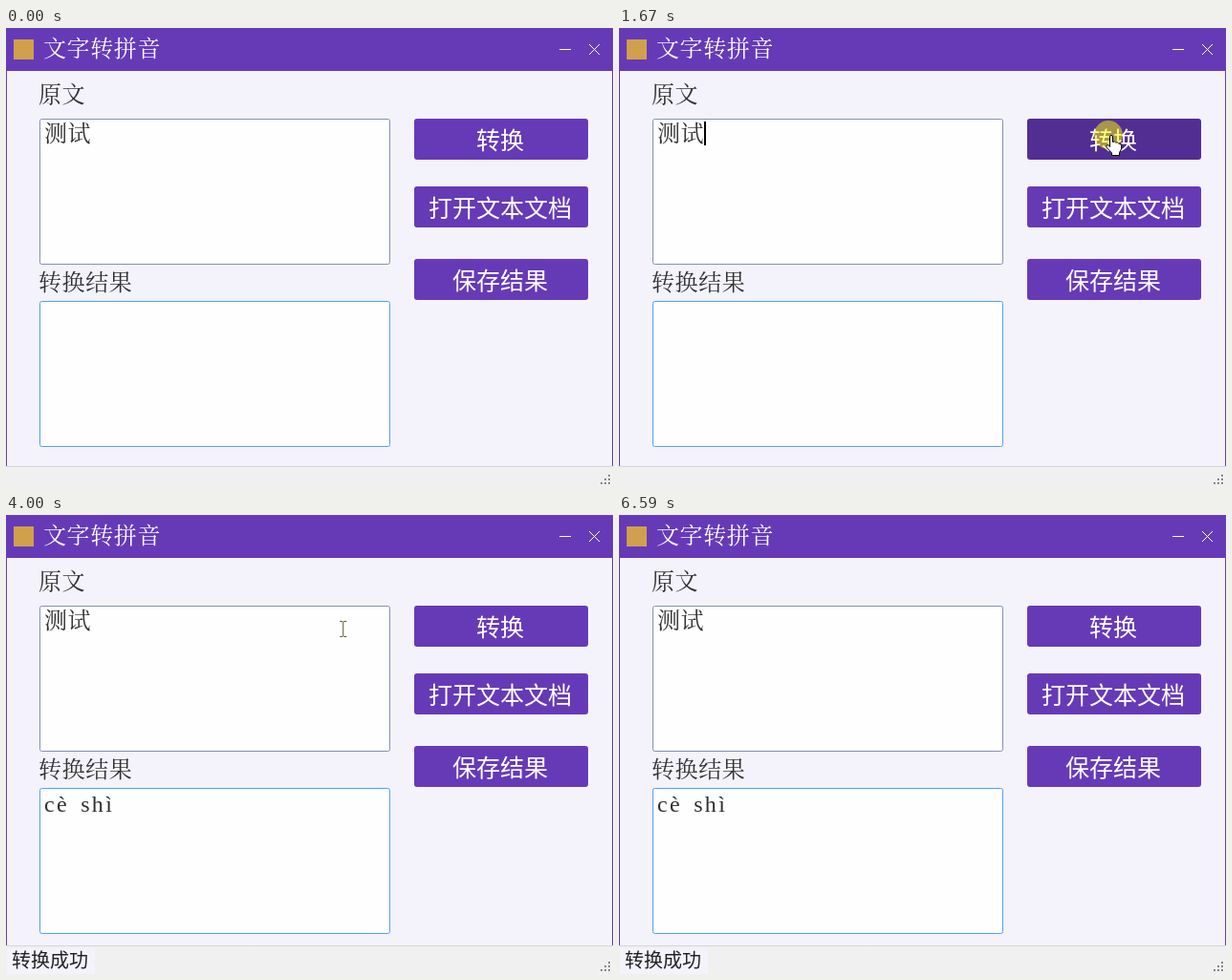
Write an HTML page that moves like this. It is 635 by 481 pixels and loops after 6.66 s.

```html
<!DOCTYPE html>
<html lang="zh-CN">
<head>
<meta charset="utf-8">
<title>文字转拼音</title>
<style>
html, body { margin: 0; width: 100%; height: 100%; overflow: hidden; background: #f4f2fb; }
svg { display: block; width: 635px; height: 481px; }
text { font: 25px "Noto Sans CJK SC", "Noto Sans CJK", sans-serif; fill: #fff; }
.song { font: 300 24px "Noto Serif CJK SC", "Noto Sans CJK SC", "Noto Sans CJK", serif; letter-spacing: .6px; }
.ink { fill: #303030; }
.pinyin { font: 24px "Liberation Serif", "Noto Serif", serif; letter-spacing: 2.3px; word-spacing: 4px; }
.status { font-size: 20px; fill: #222; }
.btn text { text-anchor: middle; }
.btn rect { fill: #663ab7; }
.crisp { shape-rendering: crispEdges; }

/* every part shares one 6660 ms loop */
.play, .btn rect { animation: 6660ms step-end infinite; }
#convert rect { animation-name: convert; }
#open rect { animation-name: open; }
#save rect { animation-name: save; }
#before { animation-name: before; }
#after { animation-name: after; }
#caretIn { animation-name: caretIn; }
#caretOut { animation-name: caretOut; }
#selection { animation-name: selection; }
#pointer { animation-name: move; }
#arrow { animation-name: arrow; }
#hand { animation-name: hand; }
#beam { animation-name: beam; }
#ring { animation-name: ring; }

@keyframes convert {
  0%, 51.951% { fill: #663ab7; }
  18.818% { fill: #8561c6; }
  25.075% { fill: #522e93; }
  100% { fill: #663ab7; }
}
@keyframes open {
  0%, 16.816%, 100% { fill: #663ab7; }
  15.915% { fill: #8561c6; }
}
@keyframes save {
  0%, 15.015%, 100% { fill: #663ab7; }
  14.114% { fill: #8561c6; }
}
@keyframes before { 0% { opacity: 1; } 51.951%, 100% { opacity: 0; } }
@keyframes after { 0% { opacity: 0; } 51.951%, 100% { opacity: 1; } }
@keyframes caretIn { 0%, 51.951%, 100% { opacity: 0; } 25.075% { opacity: 1; } }
@keyframes caretOut { 0%, 75.75%, 100% { opacity: 0; } 68.468% { opacity: 1; } }
@keyframes selection {
  0%, 98.948%, 100% { opacity: 0; clip-path: inset(0 0 0 63px); }
  75.75% { opacity: 1; clip-path: inset(0 0 0 63px); }
  76.839% { opacity: 1; clip-path: inset(0 0 0 13px); }
  77.927% { opacity: 1; clip-path: inset(0); }
}

@keyframes move {
  0% { transform: translate(565px, 470px); }
  3.603% { transform: translate(565px, 470px); animation-timing-function: steps(9); }
  13.063% { transform: translate(460px, 289px); }
  14.114% { transform: translate(469px, 256px); animation-timing-function: steps(3); }
  16.816% { transform: translate(498px, 159px); animation-timing-function: steps(3); }
  19.819% { transform: translate(514px, 112px); }
  33.033% { transform: translate(509px, 122px); animation-timing-function: steps(5); }
  38.288% { transform: translate(488px, 164px); animation-timing-function: steps(4); }
  42.492% { transform: translate(442px, 114px); animation-timing-function: steps(7); }
  49.849% { transform: translate(417px, 38px); animation-timing-function: steps(3); }
  53.003% { transform: translate(412px, 34px); }
  57.957% { transform: translate(392px, 62px); animation-timing-function: steps(9); }
  67.417% { transform: translate(213px, 318px); }
  68.468% { transform: translate(219px, 317px); }
  73.573% { transform: translate(200px, 317px); animation-timing-function: steps(4); }
  77.927% { transform: translate(7px, 281px); }
  86.786% { transform: translate(5px, 281px); animation-timing-function: steps(2); }
  88.888% { transform: translate(253px, 373px); }
  92.792% { transform: translate(358px, 405px); animation-timing-function: steps(2); }
  94.894%, 100% { transform: translate(567px, 470px); }
}
@keyframes arrow {
  0%, 14.114%, 15.915%, 18.768%, 60.06%, 66.366%, 87.837%, 95.945%, 100% { opacity: 0; }
  3.603%, 15.015%, 16.816%, 57.957%, 65.315%, 86.786%, 93.843% { opacity: 1; }
}
@keyframes hand {
  0%, 15.015%, 16.816%, 57.957%, 100% { opacity: 0; }
  14.114%, 15.915%, 18.768% { opacity: 1; }
}
@keyframes beam {
  0%, 65.315%, 79.879%, 93.843%, 100% { opacity: 0; }
  60.06%, 66.366%, 87.837% { opacity: 1; }
}
@keyframes ring {
  0%, 27.027%, 79.879%, 100% { opacity: 0; }
  25.075%, 68.468% { opacity: .5; }
}
</style>
</head>
<body>
<svg viewBox="0 0 635 481">
  <!-- window -->
  <rect width="635" height="481" fill="#663ab7"/>
  <rect x="1" y="45" width="633" height="436" fill="#f4f2fb"/>
  <rect x="8" y="12" width="21" height="21" fill="#d0a04c"/>
  <text class="song" x="39" y="30">文字转拼音</text>
  <path class="crisp" d="M579 22.5H591" stroke="#fff"/>
  <path d="M610 17L621 28M621 17L610 28" stroke="#fff"/>

  <text class="song ink" x="34" y="78">原文</text>
  <text class="song ink" x="34" y="275">转换结果</text>
  <rect x="35.5" y="95.5" width="366" height="152" rx="2" fill="#fefefe" stroke="#8291b5"/>
  <rect x="35.5" y="286.5" width="366" height="152" rx="2" fill="#fefefe" stroke="#50a0ff"/>
  <text class="song ink" x="40" y="119">测试</text>
  <rect id="caretIn" class="play" x="89" y="98" width="2" height="25"/>

  <g id="convert" class="btn"><rect x="427" y="95" width="182" height="43" rx="3"/><text x="517" y="127">转换</text></g>
  <g id="open" class="btn"><rect x="427" y="166" width="182" height="43" rx="3"/><text x="517" y="198">打开文本文档</text></g>
  <g id="save" class="btn"><rect x="427" y="242" width="182" height="43" rx="3"/><text x="517" y="274">保存结果</text></g>

  <!-- status bar, before and after the conversion -->
  <g id="before" class="play">
    <rect y="459" width="635" height="22" fill="#f0f0f0"/>
    <path d="M0 459.5H635" stroke="#d7d7d7"/>
  </g>
  <g id="after" class="play">
    <rect y="451" width="635" height="30" fill="#f0f0f0"/>
    <path d="M0 451.5H635" stroke="#d7d7d7"/>
    <rect x="1" y="454" width="92" height="27" fill="#f4f2fb"/>
    <text class="status" x="6" y="474">转换成功</text>
    <text class="pinyin ink" x="40" y="311">cè shì</text>
  </g>
  <g class="crisp" fill="none" stroke-width="2">
    <path id="grip" d="M631 469h2M627 473h2M631 473h2M623 477h2M627 477h2M631 477h2" stroke="#fff"/>
    <use href="#grip" x="0"/>
    <path d="M630 469h2M626 473h2M630 473h2M622 477h2M626 477h2M630 477h2" stroke="#858585"/>
  </g>

  <g id="selection" class="play">
    <rect x="40" y="289" width="78" height="25" fill="#0078d7"/>
    <text class="pinyin" x="40" y="311">cè shì</text>
  </g>
  <rect id="caretOut" class="play" x="117" y="289" width="2" height="25"/>

  <!-- pointer shapes, hot spot at 0,0 -->
  <g id="pointer" class="play">
    <circle id="ring" class="play" cx="-2" r="15" fill="#ff0"/>
    <path id="arrow" class="play" d="M.5 .8V16.5L4.2 13L6.7 18.4L9 17.4L6.6 12.1H11.5Z" fill="#fff" stroke="#000"/>
    <path id="hand" class="play" transform="translate(-5 0)" fill="#fff" stroke="#000"
      d="M4.5 2Q4.5 .5 6 .5T7.5 2V7.5Q9.5 6 10.7 8Q12.5 7 13.6 9Q16.5 8.5 16.5 11.5V15L14.5 18.5V21.5H6.5V19L1 13Q0 10.5 2 10.5Q3.5 10.5 4.5 12.5Z"/>
    <path id="beam" class="play crisp" d="M-3 -7.5H0M1 -7.5H4M.5 -7V8M-3 8.5H0M1 8.5H4" fill="none" stroke="#55552a"/>
  </g>
</svg>
</body>
</html>
```
